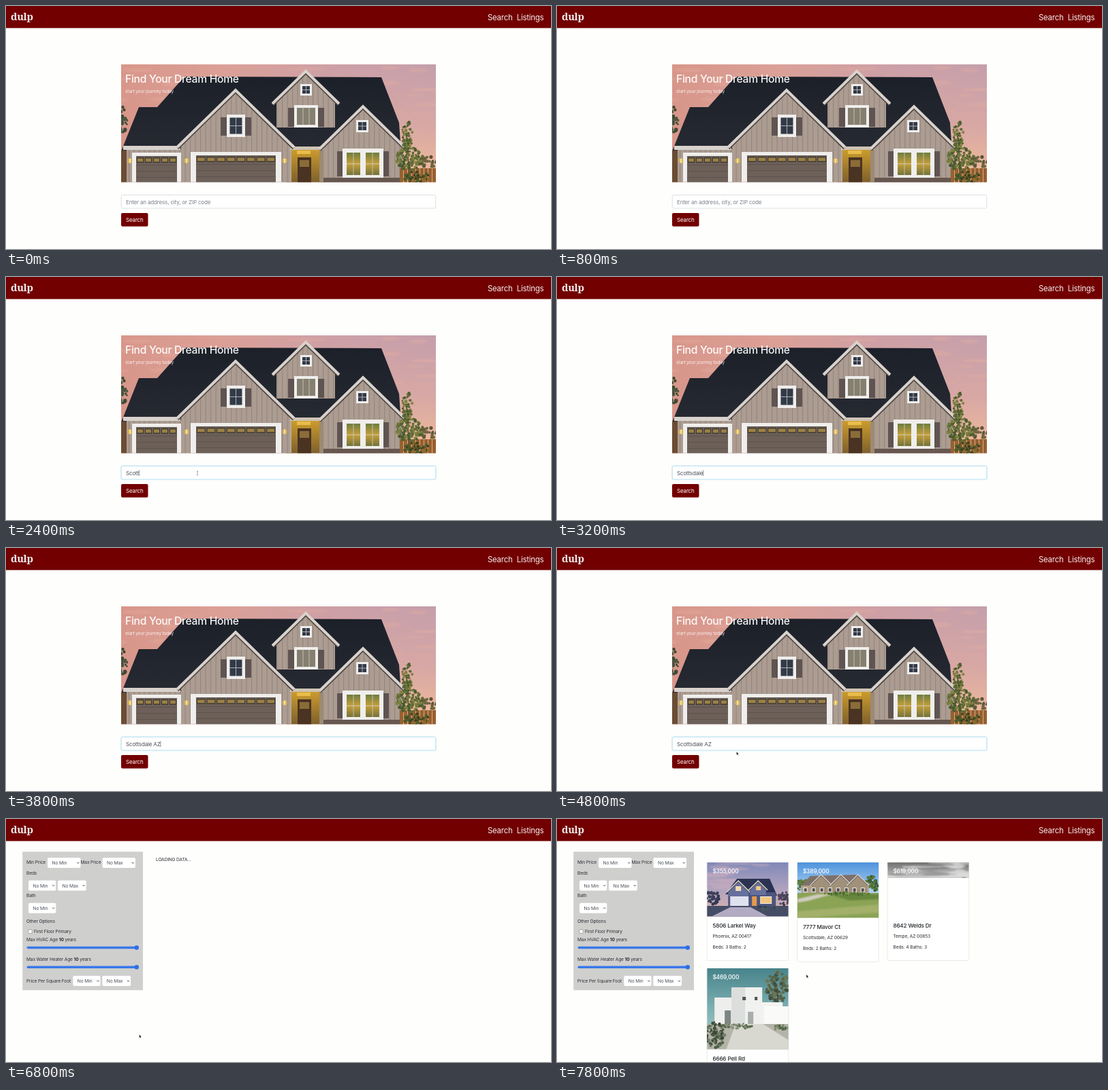
An HTML page for the animation above (8000 ms loop, 800 px wide and 358 px high).

```html
<!DOCTYPE html>
<html lang="en">
<head>
<meta charset="utf-8">
<title>Home search</title>
<style>
  html, body { margin: 0; width: 100%; height: 100%; overflow: hidden; background: #fefefc; }
  #stage { display: block; width: 100%; height: 100%; }
  text { font-family: Inter, "Open Sans", sans-serif; letter-spacing: -.02em; white-space: pre; }
  .brand { font-family: "Noto Serif", serif; font-weight: 900; }
</style>
</head>
<body>
<svg id="stage" viewBox="0 0 800 358" xmlns="http://www.w3.org/2000/svg"></svg>
<script>
const LOOP = 8000, STEP = 200;
const RED = '#720000', PAGE = '#fefefc', TRIM = '#d9d2cd', WHITE = '#efeeec', INK = '#2b2f33';

// Markup helpers
const rect = (x, y, w, h, fill, more = '') =>
  `<rect x="${x}" y="${y}" width="${w}" height="${h}" fill="${fill}" ${more}/>`;
const poly = (pts, fill) => `<polygon points="${pts}" fill="${fill}"/>`;
const line = (pts, color, w) =>
  `<polyline points="${pts}" fill="none" stroke="${color}" stroke-width="${w}"/>`;
const dot = (x, y, r, fill) => `<circle cx="${x}" cy="${y}" r="${r}" fill="${fill}"/>`;
const group = (id, body) => `<g id="${id}">${body}</g>`;
const repeat = (n, make) => Array.from({ length: n }, (_, i) => make(i)).join('');
const frame = (x, y, w, h, body) => `<svg x="${x}" y="${y}" width="${w}" height="${h}">${body}</svg>`;
const soft = body => `<g filter="url(#soft)">${body}</g>`;
// Text centred vertically on its capitals
const label = (x, mid, size, str, fill = INK, more = '') =>
  `<text x="${x}" y="${mid + size * .364}" font-size="${size}" fill="${fill}" ${more}>${str}</text>`;
// Evenly spaced colour stops, top to bottom unless told otherwise
const fade = (id, colors, dir = 'x2="0" y2="1"') => `<linearGradient id="${id}" ${dir}>`
  + colors.map((c, i) => `<stop offset="${i / (colors.length - 1)}" stop-color="${c}"/>`).join('')
  + '</linearGradient>';

function seeded(seed) {
  return () => (seed = (seed * 16807) % 2147483647) / 2147483647;
}

// Random leaves inside an ellipse
function bush(x, y, rx, ry, colors, size = 3) {
  const rnd = seeded(Math.round(x * 31 + y * 7));
  return repeat(Math.ceil(rx * ry / size / size * 3), i => {
    const a = rnd() * 6.283, d = Math.sqrt(rnd());
    return dot((x + Math.cos(a) * d * rx).toFixed(1), (y + Math.sin(a) * d * ry).toFixed(1),
      (size * (.4 + rnd() * .5)).toFixed(1), colors[i % colors.length]);
  });
}

function clouds(seed, n, w, h, color) {
  const rnd = seeded(seed);
  return soft(repeat(n, () => `<ellipse cx="${(rnd() * w).toFixed(1)}" cy="${(rnd() * h).toFixed(1)}"
    rx="${(8 + rnd() * 24).toFixed(1)}" ry="${(1 + rnd() * 2.5).toFixed(1)}" fill="${color}"/>`));
}

const defs = `<defs>
  ${fade('sky', ['#d8968a', '#dba097', '#cda0a6', '#c49fac'], 'x2="1" y2="0"')}
  ${fade('glow', ['#f0b39a00', '#f0b39a66', '#f3c09a'])}
  ${fade('roof', ['#1c2029', '#272a32'])}
  ${fade('porch', ['#d3a12e', '#7d602c'])}
  ${fade('pane', ['#6f7d3e', '#c4a03c', '#74733a'])}
  ${fade('dusk', ['#8089b8', '#b0a3bd', '#e3b5ad'])}
  ${fade('day', ['#4f93dc', '#a9d0f2', '#dcebf5'])}
  ${fade('teal', ['#47838b', '#7eb0b2', '#b5d3cd'])}
  ${fade('storm', ['#6f6f6f', '#999', '#cfcfcf'])}
  <pattern id="siding" width="7.5" height="10" patternUnits="userSpaceOnUse">
    <rect width="7.5" height="10" fill="#ac9c91"/><rect width="1.2" height="10" fill="#958780"/>
  </pattern>
  <filter id="soft"><feGaussianBlur stdDeviation="1.3"/></filter>
</defs>`;

// Gable: wall down to the floor, dark eave and light trim above it
function gable(x, top, half, floor, wall, edge = 4, slope = .98) {
  const wing = (w, y) => `${x - w},${y + w * slope} ${x},${y} ${x + w},${y + w * slope}`;
  const inner = half - edge * 1.5;
  return poly(`${wing(inner, top + 2)} ${x + inner},${floor} ${x - inner},${floor}`, wall)
    + line(wing(half - 1, top + edge * .6), '#4e4743', edge)
    + line(wing(half, top), TRIM, edge);
}

// Framed window with a grid of bars
function pane(x, y, w, h, edge, fill, cols = 2, rows = 2) {
  const gw = w - 2 * edge, gh = h - 2 * edge, bar = '#d0cdca';
  return rect(x, y, w, h, WHITE) + rect(x + edge, y + edge, gw, gh, fill)
    + repeat(cols - 1, i => rect(x + edge + gw * (i + 1) / cols - .4, y + edge, .8, gh, bar))
    + repeat(rows - 1, i => rect(x + edge, y + edge + gh * (i + 1) / rows - .4, gw, .8, bar));
}

// Shutters on both sides of a window
const shutters = (x, y, w, h) => rect(x - 9, y, 9, h, '#5f5452') + rect(x + w, y, 9, h, '#5f5452');

function garage(x, y, w, edge, lights) {
  const inner = w - 2 * edge, step = inner / lights;
  return rect(x, y, w, 60, WHITE) + rect(x + edge, y + 5, inner, 60, '#6d6059')
    + repeat(3, i => rect(x + edge, y + 18 + i * 9, inner, .8, '#5a4f4a'))
    + repeat(lights, i => rect(x + edge + i * step + 1, y + 7, step - 2, 8, '#3d3a34')
      + rect(x + edge + i * step + 2, y + 8.5, step - 4, 5, '#9c8044'));
}

function hero() {
  const wall = 'url(#siding)', glass = '#323a48', leaves = ['#5f6b36', '#7f8140', '#4b5a30'];
  const sky = rect(169, 86, 462, 174, 'url(#sky)') + rect(480, 86, 151, 174, 'url(#glow)')
    + `<g transform="translate(169 86)">${clouds(12, 26, 462, 90, '#e7aea055')}</g>`;
  const back = bush(171, 168, 7, 20, ['#3d4a34', '#4c5540'])
    + poly('262,104 551,105 577,172 580,214 169,214 195,149 222,149', 'url(#roof)')
    + rect(169, 213, 9, 47, '#6b4c34');
  const left = rect(177, 211, 82, 49, wall) + rect(172, 206, 84, 6, TRIM)
    + garage(185, 216, 72, 6, 5)
    + gable(337, 124, 86, 260, wall)
    + shutters(324, 164, 27, 27) + pane(324, 160, 27, 33, 4.5, glass)
    + garage(271, 215, 133, 8, 8);
  const dormer = gable(440, 96, 49, 179, wall)
    + pane(432, 115, 17, 17, 3, glass)
    + shutters(423, 150, 35, 28) + pane(423, 146, 35, 33, 4, '#857f70', 3, 1);
  const porch = rect(412, 207, 56, 53, 'url(#porch)') + rect(412, 207, 56, 5, '#cfc4b4')
    + rect(427, 213, 20, 5, '#e9bd4a') + rect(416, 212, 3, 48, '#b8a999') + rect(460, 212, 6, 48, '#9c8a74')
    + rect(428, 223, 20, 37, '#4a3322') + rect(431, 227, 14, 10, '#8a6c38');
  const right = gable(524, 148, 64, 260, wall)
    + pane(514, 168, 18, 18, 3, glass)
    + shutters(495, 214, 58, 37) + rect(494, 210, 60, 45, WHITE)
    + repeat(2, i => pane(495 + i * 28, 211, 30, 43, 5, 'url(#pane)'))
    + rect(466, 253, 112, 7, '#665750');
  const lamps = [182, 265, 409].map(x => dot(x, 228, 4, '#f5c84466') + rect(x - 1.3, 225, 2.6, 6, '#ffe27a')).join('');
  const garden = bush(620, 230, 16, 8, ['#59563a', '#6e6440'])
    + repeat(9, i => rect(578 + i * 6, 239, 5.2, 21, '#96602f'))
    + line('592,250 588,190', '#5a4a35', 1.5)
    + bush(589, 193, 8, 24, leaves, 2.4) + bush(592, 225, 20, 17, leaves, 2.8)
    + bush(603, 252, 20, 8, ['#4c5a2c', '#8d6a30', '#35401f']);
  return sky + back + dormer + porch + left + right + lamps + garden;
}

const searchPage = group('search',
  frame(169, 86, 462, 173.5, `<g transform="translate(-169 -86)">${hero()}</g>`)
  + label(175, 107, 15.7, 'Find Your Dream Home', '#fff', 'font-weight="500" opacity=".95"')
  + label(175, 125.3, 6.6, 'start your journey today', '#fff', 'opacity=".85"')
  + rect(168.5, 277.8, 463, 21, 'none', 'id="halo" rx="2.5" stroke="#dff2fa"')
  + rect(169.3, 278.5, 461.4, 19.5, '#fff', 'id="field" rx="2" stroke-width=".7"')
  + label(176, 289, 8, '', INK, 'id="typed"')
  + rect(0, 284.5, .6, 8.5, '#444', 'id="caret"')
  + rect(169, 305, 39.5, 19.7, RED, 'rx="2"')
  + label(176, 315, 8, 'Search', '#fff'));

function select(x, y, w, str) {
  const cx = x + w - 3.7, cy = y + 8.4;
  return rect(x, y, w, 15, '#fff', 'rx="2"') + label(x + 6.5, y + 7.8, 6.7, str, '#495057')
    + line(`${cx - 1.6},${cy - 1.6} ${cx},${cy} ${cx + 1.6},${cy - 1.6}`, '#343a40', .9);
}
const minMax = (x, y) => select(x, y, 40.3, 'No Min') + select(x + 43, y, 41.8, 'No Max');
const caption = (y, str, x = 30) => label(x, y, 6.6, str);
const slider = (y, name) => caption(y, `${name} <tspan font-weight="700">10</tspan> years`)
  + rect(30.5, y + 9.7, 164, 3.6, '#3a78e8', 'rx="1.8"') + dot(191.8, y + 11.5, 3.2, '#2f6fe4');

const filters = rect(24.2, 48.2, 176.8, 204, '#cfcfce')
  + caption(64, 'Min Price') + select(61, 57, 48.5, 'No Min')
  + caption(64, 'Max Price', 109.5) + select(141.5, 57, 48.5, 'No Max')
  + caption(79.7, 'Beds') + minMax(33, 90.5)
  + caption(113, 'Bath') + select(33, 123.7, 40.3, 'No Min')
  + caption(150.5, 'Other Options')
  + rect(32.8, 163, 5.4, 5.4, '#fff', 'rx="1" stroke="#767676" stroke-width=".6"')
  + caption(165.8, 'First Floor Primary', 41)
  + slider(178, 'Max HVAC Age') + slider(206.8, 'Max Water Heater Age')
  + caption(238.5, 'Price Per Square Foot') + minMax(98.3, 231);

// Card pictures, in card coordinates
const W = 119.5;
const sky = (h, fill) => rect(0, 0, W, h, fill);

const duskHouse = sky(80, 'url(#dusk)') + clouds(5, 12, W, 40, '#d9b3c066')
  + bush(8, 52, 11, 10, ['#3b405c', '#2f3750']) + bush(113, 53, 9, 10, ['#5b4a5c', '#41405c'])
  + poly('27,47 44,24 92,24 103,49', '#2b3352') + rect(31, 44, 70, 24, '#4c557e')
  + gable(46, 27, 17, 50, '#65709c', 1.5) + gable(75, 27, 14, 48, '#65709c', 1.5)
  + rect(42, 35, 8, 7, '#f1dcb4') + rect(72, 35, 7, 6, '#f1c886')
  + rect(34, 50, 27, 18, '#dfe1ee') + rect(66, 50, 7, 18, '#e49a4c')
  + pane(78, 50, 17, 11, 1, '#f6c677', 2, 1)
  + rect(0, 64, W, 16, '#454c66') + poly('34,66 64,66 90,80 6,80', '#b3abc4')
  + bush(90, 66, 16, 3, ['#4a5a58', '#333e55']);

const brickHouse = sky(82, 'url(#day)')
  + bush(9, 33, 13, 8, ['#4d6b38', '#64803f']) + bush(110, 31, 9, 12, ['#3f5c32', '#587a3a'])
  + poly('5,35 19,20 87,18 107,35', '#7d7068') + rect(6, 34, 99, 13, '#b3a28b')
  + [35, 64, 89].map(x => gable(x, 18, 16, 46, '#a1907a', 1.4)).join('')
  + repeat(8, i => pane(9 + i * 12, 37, 6, 7, 1, '#55524e', 1, 1))
  + rect(0, 45, W, 37, '#8aa355') + soft(poly('0,54 30,47 50,47 14,57 0,59', '#d3cec0')
  + poly('47,47 120,47 120,54 77,56', '#66863d') + poly('0,72 120,62 120,74 0,82', '#a3b06b'))
  + bush(72, 46, 34, 2.5, ['#49682f', '#5e7d36'], 2);

const cloudStrip = sky(23, 'url(#storm)') + clouds(7, 16, W, 22, '#e4e4e4aa')
  + clouds(23, 10, W, 22, '#7a7a7a88') + rect(109, 21.5, 6, 1, '#8b8b8b');

const whiteHouse = sky(120, 'url(#teal)')
  + bush(104, 28, 17, 24, ['#56644a', '#3f5040', '#6c7758'], 3.5) + line('106,80 103,30', '#4d4a3c', 2)
  + rect(11, 43, 26, 43, '#eeeeec') + rect(36, 28, 45, 58, '#f1f1ef') + rect(36, 28, 20, 58, '#dcdedd')
  + rect(80, 50, 31, 36, '#f3f3f1') + rect(52, 42, 5, 5, '#4c5454') + rect(70, 42, 4, 5, '#4c5454')
  + rect(26, 62, 9, 20, '#7c8583') + rect(60, 64, 8, 20, '#a7adab') + rect(84, 56, 36, 28, '#fafaf9')
  + rect(0, 82, W, 38, '#b3b3a8') + poly('42,82 82,82 120,106 120,120 28,120', '#d8d7d0')
  + bush(11, 98, 15, 19, ['#4c5a44', '#718066', '#39463a'])
  + bush(45, 85, 24, 4, ['#5c6b50', '#87927a'], 2.4) + bush(108, 87, 11, 4, ['#55664a', '#7d8a6c'], 2.4);

function card(col, y, artH, art, price, street, place, rooms) {
  const x = 220.2 + col * 132.5, tx = x + 8.2, ty = y + artH + 13.4;
  return rect(x, y, W, artH + 65, '#fff', 'rx="2" stroke="#e2e2e0" stroke-width=".7"')
    + frame(x, y, W, artH, art)
    + label(tx, y + 13, 8.3, price, '#fff', 'font-weight="600" opacity=".9"')
    + label(tx, ty, 8.2, street, '#212529', 'font-weight="500"')
    + label(tx, ty + 15.3, 6.7, place) + label(tx, ty + 31.5, 6.7, rooms);
}

const cards = group('cards',
  card(0, 64, 79.5, duskHouse, '$355,000', '5806 Larkel Way', 'Phoenix, AZ 00417', 'Beds: 3 Baths: 2')
  + card(1, 64, 81.5, brickHouse, '$389,000', '7777 Mavor Ct', 'Scottsdale, AZ 00629', 'Beds: 2 Baths: 2')
  + card(2, 64, 79.5, group('strip', frame(0, 0, W, 23, cloudStrip)), '$619,000', '8642 Welds Dr', 'Tempe, AZ 00853', 'Beds: 4 Baths: 3')
  + card(0, 220, 119.3, whiteHouse, '$469,000', '6666 Pell Rd', '', ''));

const resultsPage = group('results', filters + group('loading', caption(60, 'LOADING DATA...', 220)) + cards);

const nav = rect(0, 0, 800, 32.5, RED)
  + label(7, 16, 14.6, 'dulp', '#f3eded', 'class="brand"')
  + label(707, 16.7, 11.4, 'Search', '#f6eeee') + label(749.7, 16.7, 11.4, 'Listings', '#f6eeee');

const arrow = `<path d="M0 0V4.9L1.1 3.9 1.9 5.6 2.7 5.2 2 3.6 3.4 3.5Z" fill="#111" stroke="#fff" stroke-width=".35"/>`;
const beam = `<path d="M-1-2.8H1M0-2.8V2.8M-1 2.8H1" stroke="#666" stroke-width=".6"/>`;

const stage = document.getElementById('stage');
stage.innerHTML = defs + rect(0, 0, 800, 358, PAGE) + searchPage + resultsPage + nav
  + group('arrow', arrow) + group('beam', beam);

const $ = id => document.getElementById(id);
const set = (id, key, value) => $(id).setAttribute(key, value);
const show = (id, on) => set(id, 'visibility', on ? 'inherit' : 'hidden');

const FOCUS = 1200, BUTTON = 4800, RESULTS = 5600, MOVE = 6800, LOADED = 7400;
const QUERY = 'Scottsdale AZ', FIRST_KEY = 1760, KEY_GAP = 160;

// Eased travel between two points
function glide(t, from, to, a, b) {
  const k = Math.min(1, Math.max(0, (t - from) / (to - from))), e = k * k * (3 - 2 * k);
  return a.map((v, i) => v + (b[i] - v) * e);
}

function pointerAt(t) {
  const button = [195.5, 317.5];
  if (t < BUTTON) return [281, 289];
  return t < MOVE ? glide(t, BUTTON, 5400, [263.5, 300], button) : glide(t, MOVE, 7800, button, [366, 229]);
}

function draw(t) {
  const focus = t >= FOCUS;
  set('search', 'visibility', t < RESULTS ? 'visible' : 'hidden');
  set('results', 'visibility', t < RESULTS ? 'hidden' : 'visible');
  show('loading', t < LOADED);
  show('cards', t >= LOADED);
  show('strip', t >= LOADED + STEP);

  const typed = QUERY.slice(0, Math.max(0, Math.floor((t - FIRST_KEY) / KEY_GAP) + 1));
  $('typed').textContent = typed || 'Enter an address, city, or ZIP code';
  set('typed', 'fill', typed ? '#495057' : '#7a8288');
  set('field', 'stroke', focus ? '#a9d8ec' : '#d0d4d8');
  show('halo', focus);
  show('caret', typed && t < 4200);
  set('caret', 'x', 176 + (typed ? $('typed').getComputedTextLength() : 0));

  const at = `translate(${pointerAt(t)})`;
  set('beam', 'transform', at);
  set('arrow', 'transform', at);
  show('beam', focus && t < 2600);
  show('arrow', t >= BUTTON);
}

const start = performance.now();
function tick() {
  const t = (performance.now() - start) % LOOP;
  draw(Math.floor(t / STEP) * STEP);
  requestAnimationFrame(tick);
}
tick();
</script>
</body>
</html>
```
